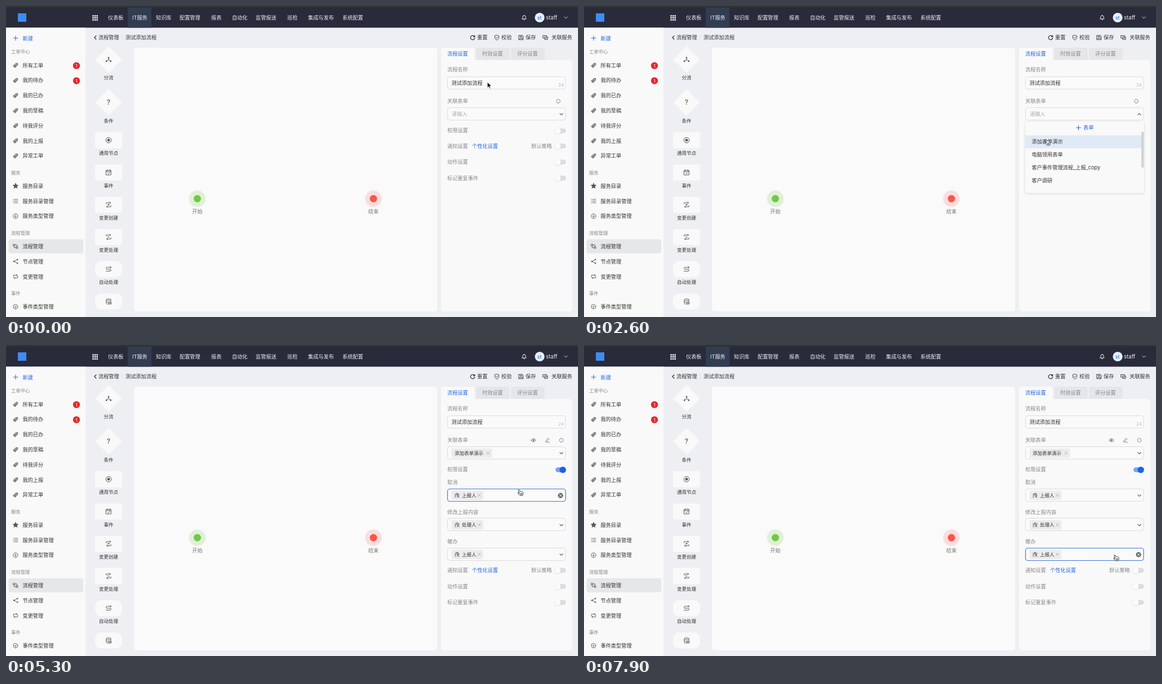
These frames come from a looping animation (1015 by 552 pixels, 8000 ms). An HTML page with a canvas:

```html
<!DOCTYPE html>
<html lang="zh">
<head>
<meta charset="utf-8">
<style>
html, body { margin: 0; width: 100%; height: 100%; overflow: hidden; background: #eeeff3; }
canvas { display: block; }
</style>
</head>
<body>
<canvas id="stage" width="1015" height="552"></canvas>
<script>
const ctx = document.getElementById('stage').getContext('2d');
const LOOP = 8000;
const FAMILY = 'Inter, "Noto Sans CJK SC", "Noto Sans CJK", sans-serif';
const BLUE = '#2468e0', INK = '#333', GREY = '#888', PANEL = '#f9f9f9';
const HAND = 500, OPEN = 1900, LOADED = 2250, PICKED = 3100, GRANTED = 4900;

const ICONS = {
  plus: 'M-4 0H4M0-4V4',
  cross: 'M-2.3-2.3L2.3 2.3M2.3-2.3L-2.3 2.3',
  down: 'M-2.7-1.3L0 1.4L2.7-1.3',
  up: 'M-2.7 1.3L0-1.4L2.7 1.3',
  back: 'M1.4-3L-1.6 0L1.4 3',
  tag: 'M-4 1.2L.6-3.5H3.7V-.5L-.9 4.1ZM-2 2.6L2-1.4M-3-.2L.2 3',
  star: 'M0-4.5L1.3-1.5L4.5-1.2L2.1 1L2.8 4.1L0 2.5L-2.8 4.1L-2.1 1L-4.5-1.2L-1.3-1.5Z',
  list: 'M-4-3H-3M-1.7-3H4M-4 0H-3M-1.7 0H4M-4 3H-3M-1.7 3H4',
  bolt: 'M4.2 0A4.2 4.2 0 1 1-4.2 0A4.2 4.2 0 1 1 4.2 0M.7-2.5L-1.5 .4H1.4L-.6 2.6',
  flow: 'M-4-3.7H-1.2V-1H-4ZM1.3 1H4V3.7H1.3ZM-2.6-1V2.4H1.3M-.8-2.4H2.6V1',
  share: 'M3.3-3.3L-3 0L3.3 3.3',
  loop: 'M-3.7 1V-2.5H2.8M1.5-3.8L3-2.5L1.5-1.2M3.7-1V2.5H-2.8M-1.5 1.2L-3 2.5L-1.5 3.8',
  hex: 'M0-4.2L3.7-2.3V2L0 4.2L-3.7 2V-2.3ZM-1.8-.8L0 .3L1.8-.8M0 .3V2.4',
  branch: 'M0-2V0L-3.3 2.6M0 0L3.3 2.6',
  event: 'M-4.3-3.6H4.3V4.4H-4.3ZM-4.3-1.5H4.3M-2.3-5V-3.3M2.3-5V-3.3M-1.8 1.2L-.3 2.6L2.2 .1',
  change: 'M-4.2-1.5V-3.6H3.4M2-5L3.6-3.6L2-2.2M4.2 1.5V3.6H-3.4M-2 2.2L-3.6 3.6L-2 5M-1.5 0H1.5M0-1.3V1.3',
  handle: 'M-4.2-1.5V-3.6H3.4M2-5L3.6-3.6L2-2.2M4.2 1.5V3.6H-3.4M-2 2.2L-3.6 3.6L-2 5M-1-1.4V.6H1.2',
  auto: 'M4.6-3.4H-2.7A1.7 1.7 0 0 0-2.7 0H2.7A1.7 1.7 0 0 1 2.7 3.4H-4.4M3-5L4.8-3.4L3-1.8',
  data: 'M-4-3.3C-4-5.2 4-5.2 4-3.3C4-1.5-4-1.5-4-3.3V3.2C-4 4.3-2 4.7-.6 4.7M-4 0C-4 1-2 1.4-.6 1.4M4-3.3V-.5M.8 .7H4.6V4.6H.8ZM1.5 2.6H4',
  refresh: 'M3-2.1A3.7 3.7 0 1 0 3.7 .6M3.7-3.7V-1.5H1.4',
  sync: 'M-3.3 1A3.5 3.5 0 0 1 2.2-2.7L2.6-1.8M3.3-1A3.5 3.5 0 0 1-2.2 2.7L-2.6 1.8',
  shield: 'M0-4.3L3.6-3V.2C3.6 2.3 1.6 3.7 0 4.4C-1.6 3.7-3.6 2.3-3.6 .2V-3ZM-1.6 0L-.3 1.3L1.8-1',
  save: 'M-3.8-3.8H2.4L3.8-2.4V3.8H-3.8ZM-1.8-3.6V-1.5H1.5V-3.6M-2 3.6V.8H2V3.6',
  link: 'M-4-3.5H2.3V1H-4ZM-1.2 1V3.4H4V-1.2H2.3M-2-1.2H.4',
  bell: 'M-3.7 2.4H3.7L2.6 .8V-1A2.6 2.6 0 0 0-2.6-1V.8ZM-.9 3.8H.9M0-4.2V-3.5',
  eye: 'M-4 0C-2-3.6 2-3.6 4 0C2 3.6-2 3.6-4 0Z',
  pen: 'M-3 2.8L-2.6 .8L1.8-3.5L3.3-2L-1 2.3ZM-.5 3.5H3.8',
  person: 'M-3.3 3.6V-2.6H3.2V-.4M-1.2-3.7H1.2M-1.5-.6H1.4M-.4 3.4C0 1.5 3.4 1.5 3.8 3.5M1.7-.2A1.1 1.1 0 1 1 1.6-.2',
  arrow: 'M0 0V10.5L2.5 8.2L4.2 11.8L6 11L4.4 7.5H7.6Z',
  hand: 'M-1.4 1.1C-2-.1-.5-.7 .2 .3L1.7 2.7C2.2 2 3 2.1 3.4 2.8C4 2.3 4.8 2.6 5.1 3.3C5.9 3 6.5 3.6 6.7 4.5L7.1 7.1L6.2 10H1.9C1 8.6-1 7.5-2.2 6.2C-2.7 5.3-1.6 4.8-.9 5.2L.5 6ZM2.8 6V8.3M4.5 6V8.3'
};
const paths = Object.fromEntries(Object.entries(ICONS).map(([k, d]) => [k, new Path2D(d)]));

// y is the middle of the line of text
function text(s, x, y, color = INK, size = 9.2, align = 'left', weight = 400) {
  ctx.font = `${weight} ${size}px ${FAMILY}`;
  ctx.textAlign = align;
  ctx.fillStyle = color;
  ctx.fillText(s, x, y + size * 0.37);
}

function icon(name, x, y, color = '#555', width = 0.9, fill) {
  ctx.save();
  ctx.translate(x, y);
  ctx.lineWidth = width;
  ctx.lineJoin = ctx.lineCap = 'round';
  if (fill) { ctx.fillStyle = fill; ctx.fill(paths[name]); }
  ctx.strokeStyle = color;
  ctx.stroke(paths[name]);
  ctx.restore();
}

function box(x, y, w, h, r, fill, stroke, width = 1) {
  ctx.beginPath();
  ctx.roundRect(x, y, w, h, r);
  if (fill) { ctx.fillStyle = fill; ctx.fill(); }
  if (stroke) { ctx.strokeStyle = stroke; ctx.lineWidth = width; ctx.stroke(); }
}

const disc = (x, y, r, fill, stroke, width) => box(x - r, y - r, 2 * r, 2 * r, r, fill, stroke, width);

function withShadow(color, blur, dy, draw) {
  ctx.save();
  ctx.shadowColor = color;
  ctx.shadowBlur = blur;
  ctx.shadowOffsetY = dy;
  draw();
  ctx.restore();
}

const clamp = v => Math.max(0, Math.min(1, v));
const ease = p => p * p * (3 - 2 * p);

const TRACK = [
  [0, 854, 136], [1200, 854, 136], [1700, 855, 190], [2100, 855, 190],
  [2500, 820, 237], [3300, 820, 237], [4200, 984, 222], [4950, 984, 222],
  [5400, 900, 262], [5900, 830, 315], [6400, 830, 315], [7200, 834, 322], [7800, 942, 373]
];

function pointerAt(t) {
  const i = TRACK.findIndex(k => k[0] > t);
  if (i < 0) { const [, x, y] = TRACK[TRACK.length - 1]; return { x, y }; }
  const [t0, x0, y0] = TRACK[i - 1], [t1, x1, y1] = TRACK[i];
  const p = ease((t - t0) / (t1 - t0));
  return { x: x0 + (x1 - x0) * p, y: y0 + (y1 - y0) * p };
}

function drawTopBar() {
  ctx.fillStyle = '#292b3b';
  ctx.fillRect(0, 0, 1015, 38.5);
  ctx.fillStyle = '#303235';
  ctx.fillRect(0, 0, 1015, 3);
  ctx.fillStyle = '#323d52';
  ctx.fillRect(216, 3, 42, 35.5);
  box(21, 13, 15, 15, 0, '#3f8cf0');
  for (let i = 0; i < 9; i++) box(153.3 + i % 3 * 3.6, 16.2 + (i / 3 | 0) * 3.6, 2.5, 2.5, 0.4, '#fff');
  [['仪表板', 181], ['IT服务', 224], ['知识库', 266], ['配置管理', 308], ['报表', 364], ['自动化', 401],
   ['监管报送', 443], ['巡检', 499], ['集成与发布', 536], ['系统配置', 597]]
    .forEach(([s, x]) => text(s, x, 20.7, '#eeeef1'));
  icon('bell', 919.5, 20.5, '#eee', 1);
  disc(947, 20.5, 8.6, '#e6effc');
  text('st', 946.7, 21, BLUE, 9, 'center');
  text('staff', 958, 20.5, '#eeeef1', 9.6);
  icon('down', 993.5, 20.5, '#ddd', 1);
}

function drawSidebar() {
  ctx.fillStyle = PANEL;
  ctx.fillRect(0, 38.5, 141, 514);
  icon('plus', 17, 57, BLUE, 1);
  text('新建', 29.5, 57.3, BLUE);
  [['工单中心', 81], ['服务', 296], ['流程管理', 403], ['事件', 510]]
    .forEach(([s, y]) => text(s, 9, y, GREY, 8.4));
  box(4.5, 414, 132.5, 25, 4, '#e6e7e9');
  ['所有工单', '我的待办', '我的已办', '我的草稿', '待我评分', '我的上报', '异常工单'].forEach((s, i) => {
    const y = 105.2 + i * 26.8;
    icon('tag', 17, y, '#555', 0.9, '#aaa');
    text(s, 29.5, y);
    if (i < 2) {
      disc(125, y + 0.7, 6.2, '#e5292e');
      text('1', 125, y + 0.8, '#fff', 7.5, 'center');
    }
  });
  [['服务目录', 319.3, 'star'], ['服务目录管理', 346.2, 'list'], ['服务类型管理', 373, 'bolt'],
   ['流程管理', 426.5, 'flow'], ['节点管理', 453.3, 'share'], ['变更管理', 480.2, 'loop'], ['事件类型管理', 533.8, 'hex']]
    .forEach(([s, y, name]) => {
      icon(name, 17, y, '#555', 0.9, name === 'star' && '#555');
      text(s, 29.5, y);
    });
  [[14, 453.3], [20.3, 450], [20.3, 456.6]].forEach(([x, y]) => disc(x, y, 1.2, '#555'));
}

function drawHeader() {
  icon('back', 158.5, 56, INK, 1.3);
  text('流程管理', 164, 56);
  ctx.fillStyle = '#dcdde0';
  ctx.fillRect(206, 51, 1, 10);
  text('测试添加流程', 212, 56);
  [['重置', 836, 'refresh'], ['校验', 879, 'shield'], ['保存', 922, 'save'], ['关联服务', 968, 'link']]
    .forEach(([s, x, name]) => {
      icon(name, x - (name === 'link' ? 11 : 8), 56, INK, name === 'refresh' ? 1.3 : 0.9);
      text(s, x, 56);
    });
}

function diamond(x, y) {
  ctx.save();
  ctx.translate(x, y);
  ctx.rotate(Math.PI / 4);
  box(-16.8, -16.8, 33.6, 33.6, 2, PANEL);
  ctx.restore();
}

function drawPalette() {
  const x = 182;
  diamond(x, 95);
  diamond(x, 171);
  icon('branch', x, 95, '#555', 1);
  [[0, -3.2], [-3.8, 3], [3.8, 3]].forEach(([dx, dy]) => disc(x + dx, 95 + dy, 1.4, '#555'));
  text('?', x, 171, '#555', 12, 'center', 500);
  ['', 'event', 'change', 'handle', 'auto', 'data'].forEach((name, i) => {
    const y = 238.2 + i * 57.25;
    box(158, y - 14.2, 48, 28.4, i > 3 ? 11 : 2, PANEL);
    if (name) icon(name, x, y, '#555', 0.95);
    else { disc(x, y, 4.8, null, '#555', 1); disc(x, y, 2.4, '#555'); }
  });
  [['分流', 127], ['条件', 204], ['通用节点', 261], ['事件', 318.5], ['变更创建', 375.8], ['变更处理', 433], ['自动处理', 490.3]]
    .forEach(([s, y]) => text(s, x, y, INK, 8.5, 'center'));
}

function drawFlow() {
  box(227, 74, 538, 468, 5, '#fafafa');
  [['开始', 339.5, '#e0f0d8', '#72c846'], ['结束', 652, '#f7dfdd', '#fc544b']].forEach(([s, x, halo, dot]) => {
    withShadow(halo, 2.5, 0, () => disc(x, 342, 14.3, halo));
    disc(x, 342, 6.5, dot);
    text(s, x, 365, '#777', 9.2, 'center');
  });
}

function toggle(y, on = 0) {
  box(975, y - 4, 18.5, 8.4, 4.2, on > 0.5 ? '#75a4f1' : '#dcdcdc');
  withShadow('rgba(0,0,0,.16)', 2, 0.5, () => disc(979 + 9 * on, y + 0.2, 5.6, on > 0.5 ? '#1764e8' : '#fbfbfb'));
}

function chip(s, y, width, person) {
  box(790.5, y - 8, width, 16.4, 2, '#ececec');
  if (person) icon('person', 800.5, y + 0.5, '#555', 0.9);
  text(s, person ? 809 : 796, y + 0.2, INK, 8.5);
  icon('cross', 790.5 + width - 7, y, '#999', 0.7);
}

function field(y, p, live, suffix = 'down') {
  const hover = live && p.x > 783 && p.x < 993 && Math.abs(p.y - y) < 11.5;
  box(783.5, Math.round(y) - 11.5, 209.5, 22, 4, '#fafafa', hover ? '#3f7bdb' : '#dcdcdc', hover ? 1.2 : 1);
  if (hover && suffix === 'clear') {
    disc(984, y + 0.5, 4.6, '#666');
    icon('cross', 984, y + 0.5, '#fff', 1);
  } else if (suffix) icon(suffix === 'up' ? 'up' : 'down', 985.5, y + 0.5, '#555', 1.1);
}

function drawMenu(t, p) {
  const loading = t < LOADED;
  withShadow('rgba(0,0,0,.14)', 4, 1, () => box(783, 205.5, 211, loading ? 44 : 126.5, 3, PANEL));
  icon('plus', 877.5, 216, BLUE, 1.1);
  text('表单', 886, 216, BLUE);
  if (loading) {
    const a = t / 1000 * Math.PI * 2;
    ctx.beginPath();
    ctx.arc(800, 235, 4.8, a, a + 5);
    ctx.strokeStyle = '#aaa';
    ctx.lineWidth = 1;
    ctx.stroke();
    text('加载中', 809, 235, GREY);
    return;
  }
  ['添加表单演示', '电脑领用表单', '客户事件管理流程_上报_copy', '客户调研'].forEach((s, i) => {
    const y = 241 + i * 23;
    if (Math.abs(p.y - y) < 11.5) {
      ctx.fillStyle = '#dfeaf6';
      ctx.fillRect(783, y - 11.5, 206, 23);
    }
    text(s, 794.5, y);
  });
  box(989, 223, 4.5, 64, 2, '#d2d2d2');
}

function drawSettings(t, p) {
  box(772, 96, 233, 446, [0, 5, 5, 5], PANEL);
  ['流程设置', '时效设置', '评分设置'].forEach((s, i) => {
    box(772 + i * 62, 74, 59.5, i ? 21.5 : 23, [4, 4, 0, 0], i ? '#e5e6e9' : PANEL);
    text(s, 783 + i * 62, 85, i ? GREY : BLUE);
  });
  const live = t >= HAND, open = t >= OPEN && t < PICKED, picked = t >= PICKED, granted = t >= GRANTED;

  text('流程名称', 783, 113, GREY);
  field(136.5, p, live, null);
  text('测试添加流程', 790.5, 136.8);
  text('24', 990, 140.5, '#bbb', 8, 'right');

  text('关联表单', 783, 168.3, GREY);
  field(191.5, p, live, open ? 'up' : picked ? 'clear' : 'down');
  if (picked) {
    icon('eye', 936, 169, '#666', 1);
    disc(936, 169, 1.5, '#666');
    icon('pen', 960.5, 169, '#777', 0.9);
    icon('sync', 985.5, 169, '#777', 0.9);
    chip('添加表单演示', 191.8, 72, false);
  } else {
    icon('sync', 980, 169, '#777', 0.9);
    text('请输入', 791, 191.5, '#aaa');
    if (open && t < LOADED) { ctx.fillStyle = '#555'; ctx.fillRect(790.5, 185.5, 0.8, 12); }
  }

  text('权限设置', 783, 221, GREY);
  toggle(221.3, clamp((t - GRANTED) / 200));
  if (granted) {
    [['取消', '上报人'], ['修改上报内容', '处理人'], ['催办', '上报人']].forEach(([label, who], i) => {
      const y = 266.7 + i * 52.4;
      text(label, 783, y - 23, GREY);
      field(y, p, live, 'clear');
      chip(who, y, 56.5, true);
    });
  }
  const shift = granted ? 151.5 : 0;
  ['通知设置', '动作设置', '标记重复事件'].forEach((s, i) => {
    const y = 248.3 + i * 28.5 + shift;
    text(s, 783, y, GREY);
    toggle(y);
  });
  text('个性化设置', 827, 248.3 + shift, BLUE);
  text('默认策略', 932, 248.3 + shift, GREY);
  if (open) drawMenu(t, p);
}

function drawPointer(t, p) {
  if (t < HAND) icon('arrow', p.x, p.y - 1, '#fff', 1, '#111');
  else icon('hand', p.x, p.y, '#222', 0.95, '#fff');
}

function render(now) {
  const t = now % LOOP, p = pointerAt(t);
  ctx.fillStyle = '#eeeff3';
  ctx.fillRect(0, 0, 1015, 552);
  drawTopBar();
  drawSidebar();
  drawHeader();
  drawPalette();
  drawFlow();
  drawSettings(t, p);
  drawPointer(t, p);
  requestAnimationFrame(render);
}

render(0);
</script>
</body>
</html>
```
